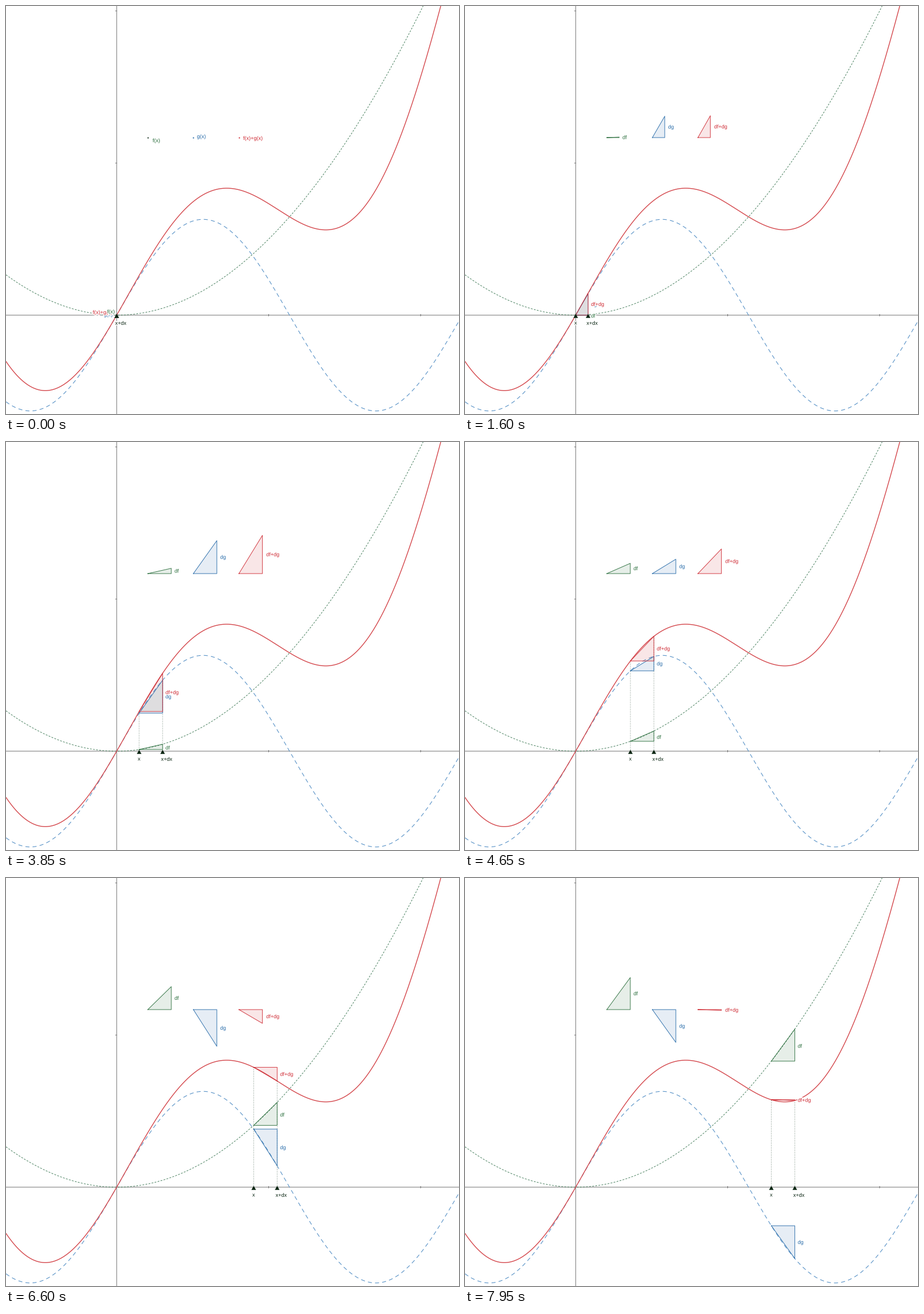
A matplotlib script that plays this animation: 789 by 710 pixels, repeating every 8 s.

```python
import numpy as np
import matplotlib.pyplot as plt
import matplotlib.patheffects as pe
from matplotlib.animation import FuncAnimation

W, H, DPI = 789, 710, 100
PX = 72 / DPI                      # points per pixel
X0, Y0, UNIT = 192.8, 538.0, 264.7
FRAMES, INTERVAL = 160, 50
DX_MAX = 40.9
GREEN, BLUE, RED, DARK = "#2a6e3c", "#2469a8", "#cf2a33", "#0a2512"
AXIS, OVERLAP = "#727272", "#dedddf"
COLORS = (GREEN, BLUE, RED)
NAMES = ("df", "dg", "df+dg")
POINT_NAMES = ("f(x)", "g(x)", "f(x)+g(x)")
KEY_X, KEY_Y = (247, 326.3, 405.7), 229


def f(x):
    return 0.5 * x ** 2 / UNIT


def g(x):
    return 166.7 * np.sin(np.pi * x / 301)


def total(x):
    return f(x) + g(x)


CURVES = (f, g, total)


def pose(n):
    """Position of x and width dx in pixels."""
    dx = min(DX_MAX, 0.5187 * n ** 1.076)
    x = 2.862 * max(0, n - 65) ** 1.052
    return x, dx


fig = plt.figure(figsize=(W / DPI, H / DPI), dpi=DPI, facecolor="white")
ax = fig.add_axes([0, 0, 1, 1])
ax.set_xlim(0, W)
ax.set_ylim(H, 0)
ax.axis("off")


def line(xs, ys, color, width, z=1, **kw):
    return ax.plot(xs, ys, color=color, lw=width * PX, zorder=z, snap=False, **kw)[0]


def patch(color, z, alpha=1):
    return ax.fill([0, 0, 0], [0, 0, 0], color=color, alpha=alpha, lw=0,
                   zorder=z, snap=False)[0]


def label(color, z):
    halo = [pe.withStroke(linewidth=3 * PX, foreground="white")]
    return ax.text(0, 0, "", color=color, fontsize=9.1 * PX, zorder=z,
                   family="Liberation Sans", ha="left", va="baseline",
                   path_effects=halo)


def place(text, s, x, y):
    text.set_text(s)
    text.set_position((x, y + 3))


def triangle(color, z):
    edge = line([], [], color, 1, z + 0.5, alpha=0.9, solid_joinstyle="round")
    return patch(color, z, 0.115), edge


def set_triangle(tri, x, y, w, h):
    pts = np.array([(x, y), (x + w, y), (x + w, y - h), (x, y)])
    tri[0].set_xy(pts)
    tri[1].set_data(pts[:, 0], pts[:, 1])
    return pts


# axes with small ticks
line([0, W], [Y0, Y0], AXIS, 1)
line([X0, X0], [0, H], AXIS, 1)
for k in (1, 2):
    line([X0 + k * UNIT] * 2, [Y0 - 1.5, Y0 + 1.5], AXIS, 1)
    line([X0 - 2, X0], [Y0 - k * UNIT] * 2, AXIS, 1)

# curves
xs = np.linspace(-X0, W - X0 + 2, 900)
line(X0 + xs, Y0 - f(xs), "#4a8160", 1, 2, dashes=(3, 2.4))
line(X0 + xs, Y0 - g(xs), "#5590c6", 1.1, 2, dashes=(7 / 1.1, 5.5 / 1.1))
line(X0 + xs, Y0 - total(xs), "#d4474c", 1.4, 3)

drops = [line([], [], "#6d8274", 1, 2.5, dashes=(1, 2), dash_capstyle="butt")
         for _ in range(2)]
marks = [patch(DARK, 8) for _ in range(2)]
mark_labels = [label(DARK, 9) for _ in range(2)]
key_tris = [triangle(c, 4 + i) for i, c in enumerate(COLORS)]
tris = [triangle(c, 4 + i) for i, c in enumerate(COLORS)]
overlap = patch(OVERLAP, 6.2)      # where the dg and df+dg triangles meet
key_labels = [label(c, 9) for c in COLORS]
labels = [label(c, z) for c, z in zip(COLORS, (7.3, 7.1, 7.5))]
dots = [line([x], [KEY_Y], c, 1, 7, marker="o", ms=2.2 * PX, mew=0)
        for x, c in zip(KEY_X, (DARK, BLUE, RED))]
tris[1][1].set_zorder(6.3)


def draw(n):
    x, dx = pose(n)
    start = n == 0
    left, right = X0 + x, X0 + x + dx

    for drop, mark, pos, v in zip(drops, marks, (left, right), (x, x + dx)):
        drop.set_data([pos, pos], [Y0, Y0 - total(v)])
        mark.set_xy([(pos, 535.6), (pos + 4, 542.8), (pos - 4, 542.8)])
    place(mark_labels[0], "x", left - 2.4, 551.3)
    place(mark_labels[1], "x+dx", right - 2.7, 551.8)

    for i, fn in enumerate(CURVES):
        y, rise = fn(x), fn(x + dx) - fn(x)
        set_triangle(key_tris[i], KEY_X[i], KEY_Y, dx, rise)
        pts = set_triangle(tris[i], left, Y0 - y, dx, rise)
        dots[i].set_visible(start)
        if start:
            place(key_labels[i], POINT_NAMES[i], (255.3, 332.5, 413)[i],
                  (234, 227, 230)[i])
            place(labels[i], POINT_NAMES[i], (176.3, 170.3, 151)[i],
                  (531.8, 537, 533)[i])
            labels[i].set_zorder((7.6, 7.1, 7.3)[i])
        else:
            place(key_labels[i], NAMES[i], KEY_X[i] + dx + (5.5, 5.8, 6.5)[i],
                  KEY_Y - rise / 2)
            place(labels[i], NAMES[i], right + 5,
                  Y0 - y - rise / 2 + (1.6, 0, 0)[i])
            labels[i].set_zorder((7.3, 7.1, 7.5)[i])
    overlap.set_xy(pts)
    overlap.set_clip_path(tris[1][0])
    return []


anim = FuncAnimation(fig, draw, frames=FRAMES, interval=INTERVAL,
                     init_func=lambda: draw(0), repeat=True, repeat_delay=0,
                     blit=False)
plt.show()
```
